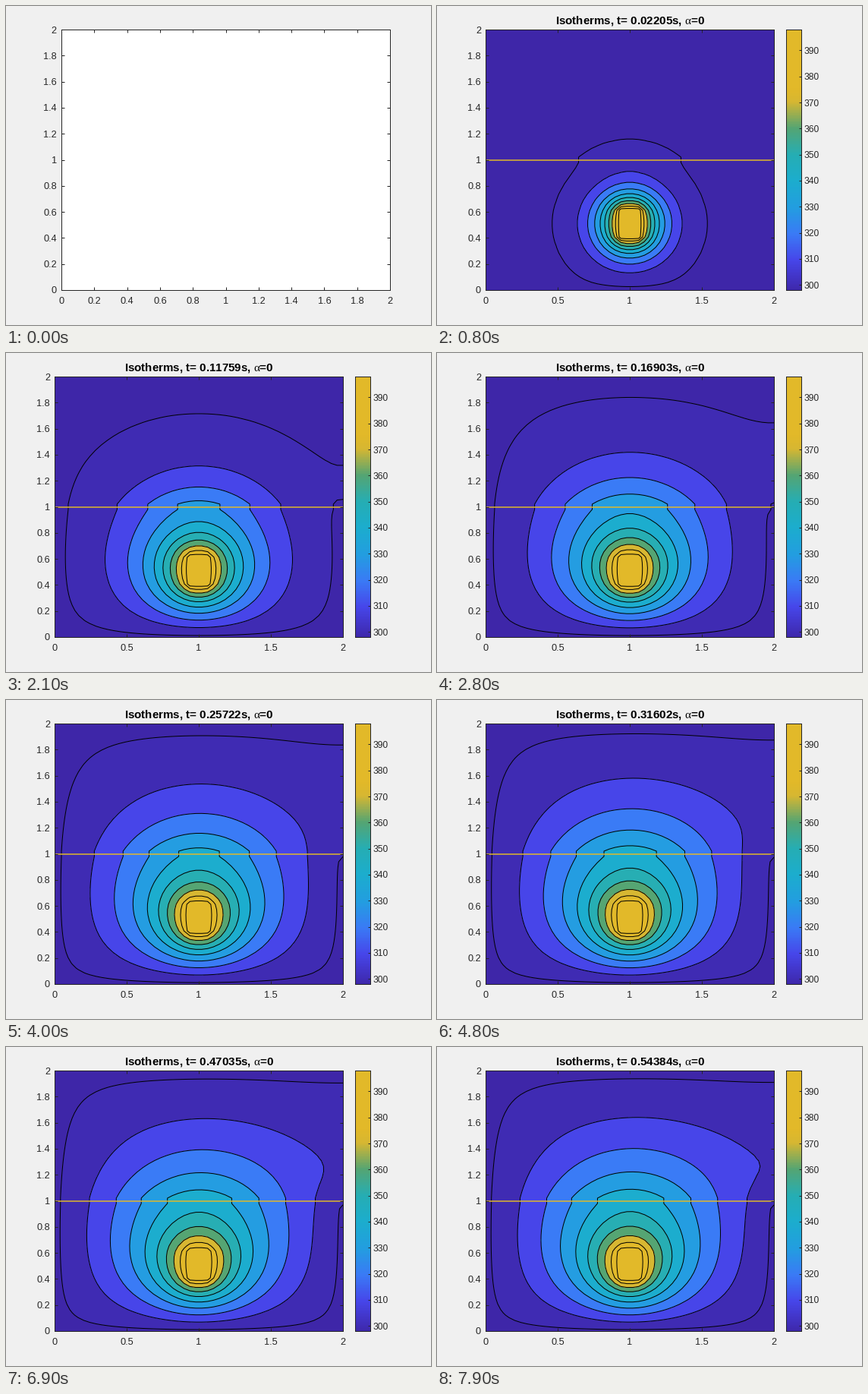
These frames come from a looping animation (560 by 420 pixels, 8 s). A matplotlib script:

```python
import numpy as np
import matplotlib.pyplot as plt
from matplotlib.animation import FuncAnimation
from matplotlib.colors import LinearSegmentedColormap

W, H, DPI = 560, 420, 100
PX = 72 / DPI                      # one pixel in points
INK = (38 / 255,) * 3

plt.rcParams.update({
    "font.family": "Liberation Sans",
    "mathtext.fontset": "custom",
    "mathtext.rm": "Liberation Serif",
    "axes.linewidth": PX,
    "axes.edgecolor": INK,
})

# --- heat conduction in two stacked layers around a hot block ---
N = 50
GRID = np.linspace(0, 2, N)
STEP = GRID[1]
MID = N // 2                       # first row of the upper layer
COLD, HOT = 298.0, 398.0
D_LOW, D_UP, K_RATIO = 1.12, 1.2, 0.56
DT, SAVE_EVERY = 2.44973e-6, 3000
SUB = 40
BLANK, FRAMES = 5, 80


def apply_bounds(T):
    T[0] = T[-1] = COLD
    T[:, 0] = COLD
    T[:MID + 1, -1] = COLD
    T[MID + 1:-1, -1] = T[MID + 1:-1, -2]
    T[10:16, 23:27] = HOT
    face = (T[MID - 2] + K_RATIO * T[MID + 1]) / (1 + K_RATIO)
    T[MID - 1] = T[MID] = face


def simulate(count):
    T = np.full((N, N), COLD)
    apply_bounds(T)
    rate = np.full((N - 2, 1), D_LOW)
    rate[MID - 1:] = D_UP
    rate *= DT * SAVE_EVERY / SUB / STEP**2
    fields = [T.copy()]
    for _ in range(count - 1):
        for _ in range(SUB):
            lap = (T[2:, 1:-1] + T[:-2, 1:-1] + T[1:-1, 2:] + T[1:-1, :-2]
                   - 4 * T[1:-1, 1:-1])
            T[1:-1, 1:-1] += rate * lap
            apply_bounds(T)
        fields.append(T.copy())
    return fields


FIELDS = simulate(FRAMES - BLANK)

# --- colours ---
STOPS = [
    (298, (62, 38, 168)), (310, (71, 70, 234)), (320, (58, 123, 246)),
    (330, (35, 158, 224)), (340, (28, 173, 206)), (350, (38, 174, 180)),
    (360, (85, 165, 115)), (370, (215, 183, 50)), (375, (226, 185, 41)),
    (398, (226, 185, 41)),
]
CMAP = LinearSegmentedColormap.from_list(
    "heat", [((t - COLD) / (HOT - COLD), np.array(c) / 255) for t, c in STOPS])
GOLD = CMAP(1.0)
LEVELS = np.arange(300, 391, 10)
BANDS = np.concatenate([[290], LEVELS, [400]])
BAND_COLORS = [CMAP((max(b, COLD) - COLD) / (HOT - COLD)) for b in BANDS[:-1]]

# --- layout ---
fig = plt.figure(figsize=(W / DPI, H / DPI), dpi=DPI, facecolor="#f0f0f0")


def add_axes(left, right, top=31, bottom=374):
    return fig.add_axes([left / W, 1 - bottom / H,
                         (right - left) / W, (bottom - top) / H])


def style_plot(ax, xstep, tick):
    ax.set(xlim=(0, 2), ylim=(0, 2))
    xs, ys = np.arange(0, 2.01, xstep), np.arange(0, 2.01, 0.2)
    ax.set_xticks(xs, [f"{v:.4g}" for v in xs])
    ax.set_yticks(ys, [f"{v:.4g}" for v in ys])
    ax.tick_params(direction="in", top=True, right=True, length=tick * PX,
                   width=PX, color=INK, labelcolor=INK, labelsize=12.8 * PX)
    ax.tick_params(axis="x", pad=9 * PX)
    ax.tick_params(axis="y", pad=6 * PX)
    ax.set_axisbelow(False)


empty = add_axes(73, 506)
style_plot(empty, 0.2, 4.3)

plot = add_axes(64, 444)
style_plot(plot, 0.5, 3.8)
plot.plot([0, 2], [1, 1], color=GOLD, lw=1.5 * PX, zorder=2.2)

bar = add_axes(460, 480)
bar.imshow(np.linspace(0, 1, 256)[:, None], cmap=CMAP, origin="lower",
           aspect="auto", extent=(-0.1, 1.1, COLD - 1, HOT + 1))
bar.set(xlim=(0, 1), ylim=(COLD, HOT))
bar.set_xticks([])
bar.set_yticks(LEVELS)
bar.yaxis.tick_right()
bar.tick_params(direction="in", length=3.4 * PX, width=PX, color=INK,
                labelcolor=INK, labelsize=12 * PX, pad=4 * PX)

title = fig.text(254.7 / W, 1 - 24 / H, "", ha="center", va="baseline",
                 weight="bold", size=15.1 * PX, color="black")

drawn = []


def draw(i):
    while drawn:
        drawn.pop().remove()
    k = i - BLANK
    active = k >= 0
    empty.set_visible(not active)
    for art in (plot, bar, title):
        art.set_visible(active)
    if not active:
        return []
    T = FIELDS[k]
    drawn.append(plot.contourf(GRID, GRID, T, BANDS, colors=BAND_COLORS,
                               zorder=1))
    drawn.append(plot.contour(GRID, GRID, T, LEVELS, colors="black",
                              linewidths=PX, zorder=2))
    t = DT * (1 + SAVE_EVERY * k)
    title.set_text(f"Isotherms, t= {t:.5g}s, " + r"$\mathrm{\alpha}$=0")
    return []


anim = FuncAnimation(fig, draw, frames=FRAMES, init_func=lambda: draw(0),
                     interval=100, repeat=True, repeat_delay=0, blit=False)
plt.show()
```
